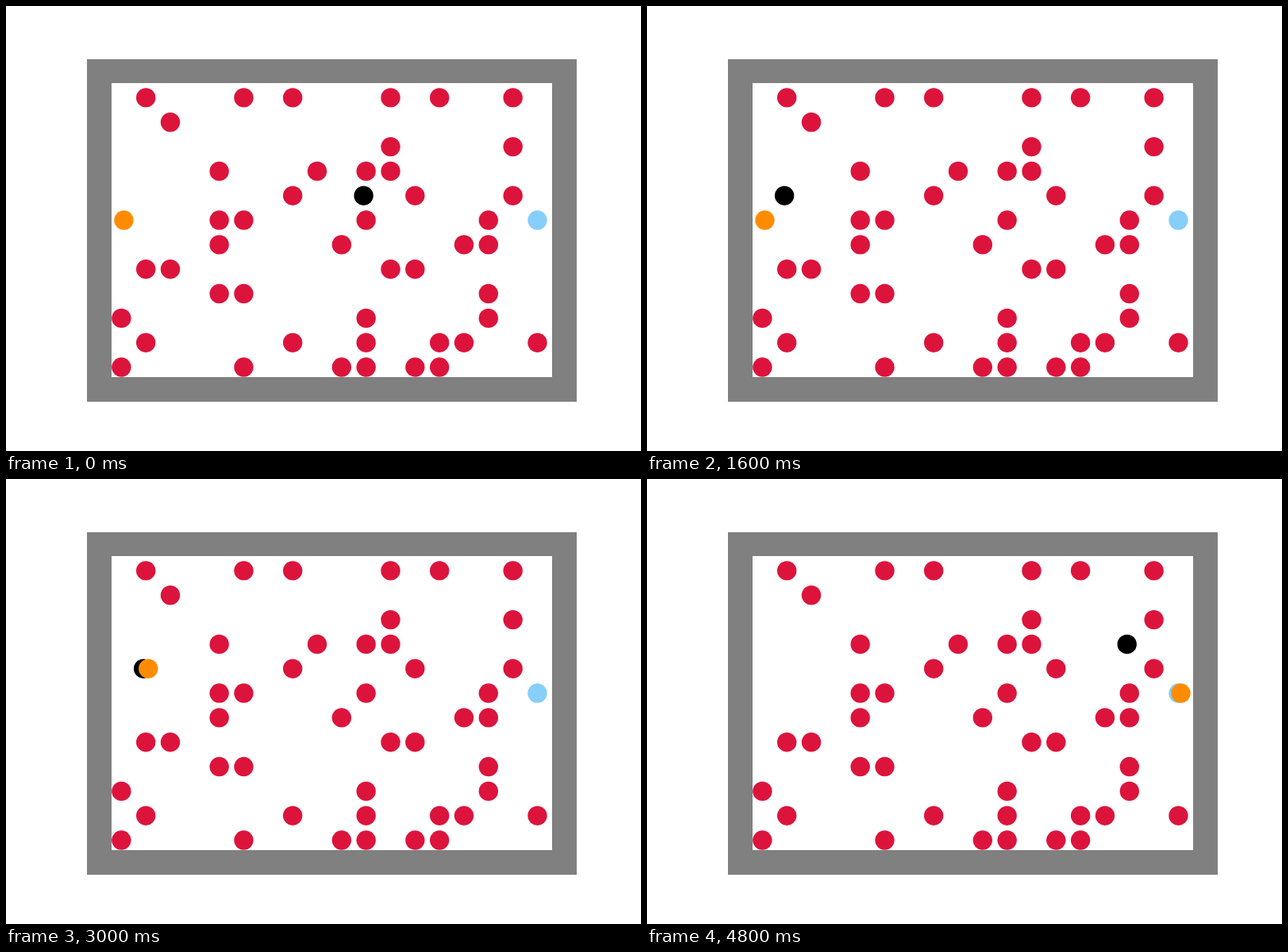
These frames come from a looping animation (800x560 px, 4.9 s). An HTML page:

```html
<!DOCTYPE html>
<html lang="en">
<head>
<meta charset="utf-8">
<title>Grid walk</title>
<style>
  html, body { margin: 0; width: 100%; height: 100%; overflow: hidden; background: #fff; }
  svg { display: block; }
  rect { fill: none; stroke: #808080; shape-rendering: crispEdges; }
</style>
</head>
<body>
<svg id="stage" width="800" height="560" viewBox="0 0 800 560">
  <rect x="117.5" y="82" width="586" height="400.5" stroke-width="31"/>
  <rect x="133" y="97" width="555" height="370" style="fill: #fff; stroke: none"/>
</svg>
<script>
const CELL = 30.83, LEFT = 145.36, TOP = 115.42, RADIUS = 12.2;
const SHIFT = CELL / 10;
const TICK = 100, LOOP = 4900;
const HOME = [0, 5], GOAL = [17, 5];
const stage = document.getElementById('stage');

// Columns of the obstacles, one string per row
const obstacles = [
  [1, 5, 7, 11, 13, 16], [2], [11, 16], [4, 8, 10, 11],
  [7, 12, 16], [4, 5, 10, 15], [4, 9, 14, 15], [1, 2, 11, 12],
  [4, 5, 15], [0, 10, 15], [1, 7, 10, 13, 14, 17], [0, 5, 9, 10, 12, 13]
];

// Turning points of the guide: tick, column, row
const route = [
  [0, 10, 4], [1, 9, 4], [3, 9, 2], [4, 8, 1], [8, 4, 1], [11, 2, 4],
  [26, 2, 4], [28, 0, 6], [29, 0, 5], [30, 1, 4], [32, 3, 3],
  [33, 3, 3], [34, 3, 2], [36, 5, 1], [38, 5, 1], [42, 13, 1],
  [43, 13, 1], [44, 14, 1], [46, 15, 3]
];

function place(dot, [col, row], shift = 0) {
  dot.setAttribute('cx', LEFT + col * CELL + shift);
  dot.setAttribute('cy', TOP + row * CELL);
}

function addDot(color, cell) {
  const dot = document.createElementNS('http://www.w3.org/2000/svg', 'circle');
  dot.setAttribute('r', RADIUS);
  dot.setAttribute('fill', color);
  place(dot, cell);
  return stage.appendChild(dot);
}

// Walks evenly between turning points, always standing on a whole cell
function guideCell(tick) {
  if (tick > 13 && tick < 26) return [1 + tick % 2, 4];
  const next = route.findIndex(stop => stop[0] > tick);
  if (next < 0) return route.at(-1).slice(1);
  const [t0, ...from] = route[next - 1];
  const [t1, ...to] = route[next];
  const part = (tick - t0) / (t1 - t0);
  return from.map((value, i) => Math.round(value + (to[i] - value) * part));
}

// Waits at home, joins the guide, then goes on alone to the goal
function walkerCell(tick) {
  if (tick < 30) return HOME;
  if (tick < 47) return guideCell(tick);
  return [GOAL[0], GOAL[1] - (48 - tick)];
}

obstacles.forEach((cols, row) => cols.forEach(col => addDot('#dc143c', [col, row])));
addDot('#87cefa', GOAL);
const guide = addDot('#000', guideCell(0));
const walker = addDot('#ff8c00', HOME);

const start = performance.now();
function draw() {
  const tick = Math.floor((performance.now() - start) % LOOP / TICK);
  place(guide, guideCell(tick), -SHIFT);
  place(walker, walkerCell(tick), SHIFT);
  requestAnimationFrame(draw);
}
draw();
</script>
</body>
</html>
```
